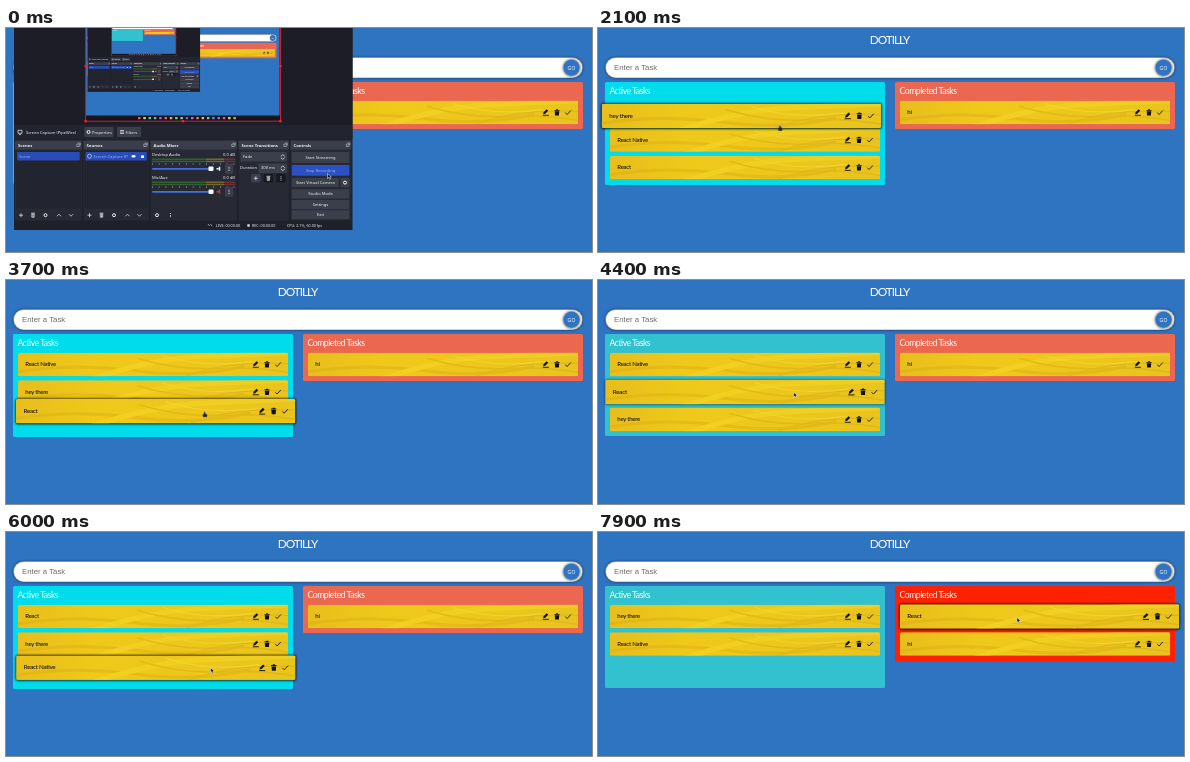
Write an HTML page that moves like this. It is 586 px wide and 224 px high and loops after 8000 ms.

```html
<!DOCTYPE html>
<html lang="en">
<head>
<meta charset="utf-8">
<title>Task board</title>
<style>
html, body { margin: 0; width: 100%; height: 100%; overflow: hidden; background: #2f74c0; }
svg { display: block; }
text { white-space: pre; }
.hand { font-family: Lato, sans-serif; }
.title { font-size: 11.8px; letter-spacing: -1px; fill: #fff; }
.head { font-size: 8.7px; letter-spacing: -.48px; fill: #fff; }
.task { font-size: 6.1px; letter-spacing: -.28px; fill: #000; }
.field { font: 7.8px "Liberation Sans", Arial, sans-serif; fill: #6c6c6c; }
.go { font: 5px "Liberation Sans", Arial, sans-serif; fill: #fff; }
.ui { font: 4.1px "Noto Sans", sans-serif; fill: #f0f1f4; }
.ui.bold { font-weight: 700; font-size: 4.2px; }
.ui.tiny { font-size: 3.7px; }
.ui.faint { fill: #9db4ee; }
</style>
</head>
<body>
<svg id="stage" width="586" height="224" viewBox="0 0 586 224">
  <defs>
    <filter id="soft" x="-20%" y="-50%" width="140%" height="200%"><feGaussianBlur stdDeviation="1.2"/></filter>
    <clipPath id="cardClip"><rect x="-135" y="-11.8" width="270" height="23.6" rx="1.5"/></clipPath>
    <clipPath id="previewClip"><rect x="80" width="194" height="93"/></clipPath>
    <linearGradient id="paint">
      <stop offset="0" stop-color="#e8be1c"/>
      <stop offset=".3" stop-color="#efc91a"/>
      <stop offset="1" stop-color="#e9c41d"/>
    </linearGradient>
    <g id="icons" fill="#111">
      <path d="M-35.2 2.8h6" stroke="#111" stroke-width=".9"/>
      <path d="M-34.8 1.7l.4-1.9 3-3 1.6 1.5-3 3z"/>
      <path d="M-23.6 -2.6h1.4l.4-.7h1.6l.4.7h1.4v.9h-5.2zM-23.2 -1.2h4.4l-.3 4.2h-3.8z"/>
      <path d="M-12.7 .2l1.8 1.8 3.7-4" fill="none" stroke="#111" stroke-width=".9"/>
    </g>
    <g id="paper" clip-path="url(#cardClip)">
      <rect x="-135" y="-11.8" width="270" height="23.6" fill="url(#paint)"/>
      <g fill="none" stroke-linecap="round" opacity=".45">
        <path d="M-140 8Q-80 -2 -20 6T90 2" stroke="#d9ae16" stroke-width="3"/>
        <path d="M-60 14Q0 -6 50 -8T140 -12" stroke="#f6d92c" stroke-width="5"/>
        <path d="M-15 -6Q25 6 65 4T140 9" stroke="#d6ab18" stroke-width="1.6"/>
        <path d="M10 -9Q50 4 100 -3" stroke="#f9e247" stroke-width="1.3"/>
        <path d="M30 13Q70 -4 138 -1" stroke="#cfa414"/>
      </g>
    </g>
  </defs>
</svg>
<script>
const LOOP = 8000, STEP = 100;
const stage = document.getElementById("stage");

function el(parent, tag, attrs = {}, content = "") {
  const node = document.createElementNS("http://www.w3.org/2000/svg", tag);
  for (const k in attrs) node.setAttribute(k, attrs[k]);
  if (content) node.textContent = content;
  return parent.appendChild(node);
}
const box = (p, x, y, width, height, fill, rx = 0) => el(p, "rect", { x, y, width, height, fill, rx });
const dot = (p, cx, cy, r, fill) => el(p, "circle", { cx, cy, r, fill });
const label = (p, x, y, s, cls, anchor = "start") => el(p, "text", { x, y, class: cls, "text-anchor": anchor }, s);
const line = (p, d, stroke = "#f0f1f4", width = .7) => el(p, "path", { d, stroke, "stroke-width": width, fill: "none" });
function blur(node, opacity) {
  node.setAttribute("filter", "url(#soft)");
  node.setAttribute("opacity", opacity);
  return node;
}
const home = (col, slot) => ({ x: 147 + 290 * col, y: 84.5 + 27.5 * slot });

function drawCard(p, text) {
  const node = el(p, "g");
  const shade = blur(box(node, -135.5, -12.3, 271, 25, "#000", 2), 0);
  el(node, "use", { href: "#paper" });
  label(node, -127.7, 1.6, text, "hand task");
  el(node, "use", { href: "#icons", x: 135 });
  return { node, shade };
}
function place(card, { x, y }, lift = 0, shade = 0) {
  card.node.setAttribute("transform", `translate(${x} ${y}) scale(${1 + lift * .035})`);
  card.shade.setAttribute("opacity", shade);
}

function drawPage(p) {
  box(p, 0, 0, 586, 280, "#2f74c0");
  label(p, 291.5, 15.9, "DOTILLY", "hand title", "middle");
  blur(box(p, 7, 29, 570, 21.5, "#000", 10.7), .4);
  box(p, 7.3, 29.3, 569.4, 20.7, "#a9a9a4", 10.3);
  box(p, 8, 30, 568, 19.4, "#fff", 9.7);
  label(p, 16, 42.4, "Enter a Task", "field");
  blur(dot(p, 565.5, 39.8, 9, "#000"), .5);
  dot(p, 565.5, 39.7, 8, "#2f74c0");
  label(p, 565.5, 41.5, "GO", "go", "middle");
  return ["Active Tasks", "Completed Tasks"].map((name, i) => {
    const column = box(p, 7 + 290 * i, 54, 280, i ? 47 : 102, i ? "#eb6750" : "#31c1cf", 1.5);
    label(p, 11.5 + 290 * i, 65.8, name, "hand head");
    return column;
  });
}

// Recorder window
const plus = (p, x, y) => line(p, `M${x - 2} ${y}h4M${x} ${y - 2}v4`);
const trash = (p, x, y) => line(p, `M${x - 2} ${y - 2}h4M${x - 1.2} ${y - 1}v3h2.400v-3zM${x} ${y - 1}v3`);
const gear = (p, x, y) => line(p, `M${x - 1.5} ${y}a1.500 1.500 0 1 0 3 0a1.500 1.500 0 1 0 -3 0`, "#f0f1f4", 1);
const chevron = (p, x, y, s) => line(p, `M${x - 2} ${y + s}l2 ${-2 * s}l2 ${2 * s}`);
const dots = (p, x, y) => [-1.6, 0, 1.6].forEach(d => dot(p, x, y + d, .5, "#f0f1f4"));
const key = (p, x, y, w, h) => box(p, x, y, w, h, "#3b3f4c", 1);

function drawPreview(p, depth) {
  const view = el(p, "g", { "clip-path": "url(#previewClip)" });
  const screen = el(view, "g", { transform: "translate(79 -3.2) scale(.332)" });
  drawPage(screen);
  place(drawCard(screen, "hi"), home(1, 0));
  if (depth) drawWindow(screen, depth - 1);
  box(view, 80, 87.5, 194, 5, "#14151c");
  for (let i = 0; i < 19; i++) box(view, 132 + i * 5.3, 89, 2.5, 2.2, `hsl(${i * 67} 60% 62%)`);
  line(p, "M79.7 0V93.2H274.5V0", "#e0222c", .9);
  for (const x of [79.7, 177, 274.5])
    for (const y of [38, 93.2]) if (x != 177 || y > 38) box(p, x - 1.2, y - 1.2, 2.4, 2.4, "#f0202c");
}

function drawMixer(p, y, name) {
  label(p, 146, y, name, "ui");
  label(p, 229, y, "0.0 dB", "ui", "end");
  for (const dy of [2.2, 4.4]) {
    box(p, 146, y + dy, 54, 1.5, "#32602f");
    box(p, 200, y + dy, 18, 1.5, "#706a31");
    box(p, 218, y + dy, 11, 1.5, "#713035");
  }
  for (let i = 0; i < 13; i++) box(p, 146 + i * 6.8, y + 7, .6, 1.5, "#b4b7c0");
  box(p, 146, y + 11.6, 60, 1.8, "#3f6fe0", .9);
  box(p, 202.5, y + 10.3, 5, 4.4, "#fff", 1);
  line(p, `M210.500 ${y + 12.5}h2M213.500 ${y + 10.5}v4`, name == "Mic/Aux" ? "#d0333c" : "#f0f1f4", 1.6);
  key(p, 219, y + 7.5, 8, 10);
  dots(p, 223, y + 12.5);
}

function drawWindow(p, depth) {
  const win = el(p, "g");
  box(win, 8, 0, 338.5, 202, "#1e202a");
  box(win, 8, 0, 338.5, 97, "#1d1d28");
  drawPreview(win, depth);
  box(win, 8, 97, 338.5, 14, "#22252f");
  line(win, "M12 102.3h4v3h-4zM13 106.6h2");
  label(win, 20, 105.6, "Screen Capture (PipeWire)", "ui");
  key(win, 78.5, 99, 29, 10);
  gear(win, 82.5, 104);
  label(win, 86, 105.6, "Properties", "ui");
  key(win, 111, 99, 24, 10);
  line(win, "M114 102.5h4M114 104h4M114 105.5h4");
  label(win, 119.5, 105.6, "Filters", "ui");

  const docks = { Scenes: 9, Sources: 77.5, "Audio Mixer": 144.5, "Scene Transitions": 232.5, Controls: 284.5 };
  const edges = [...Object.values(docks), 347];
  Object.keys(docks).forEach((name, i) => {
    const x = edges[i], w = edges[i + 1] - x - 1.7;
    box(win, x, 112.5, w, 80, "#272a35", 1);
    box(win, x, 112.5, w, 9, "#3a3e4b", 1);
    label(win, x + 3, 118.6, name, "ui bold");
    line(win, `M${x + w - 5} 116h2.500v2.500h-2.500zM${x + w - 4} 115h2.500v2.500`, "#d6d8de", .5);
    if (i > 1) return;
    box(win, x + 1, 122.5, w - 2, 58, "#22242f");
    box(win, x + 2, 124, w - 4, 8.5, "#284cb8", 1);
    plus(win, x + 6, 187.2);
    trash(win, x + 18, 187.2);
    gear(win, x + 30.5, 187.2);
    chevron(win, x + 44, 187.2, 1);
    chevron(win, x + 56, 187.2, -1);
  });
  label(win, 13, 129.7, "Scene", "ui faint");
  line(win, "M81.500 128.200a2 2 0 1 0 4 0a2 2 0 1 0 -4 0", "#c9d5f6");
  label(win, 87.5, 129.7, "Screen Capture (P", "ui faint");
  box(win, 125.5, 127, 4, 2.4, "#eef1fa", 1.2);
  box(win, 135, 127.4, 3, 2.6, "#eef1fa");
  gear(win, 151, 187.2);
  dots(win, 164.5, 187.2);

  drawMixer(win, 128.3, "Desktop Audio");
  drawMixer(win, 151.3, "Mic/Aux");

  key(win, 234.5, 124, 46.5, 9.5);
  label(win, 237, 130.2, "Fade", "ui");
  label(win, 234, 141.4, "Duration", "ui");
  key(win, 252.5, 135.5, 28.5, 9.5);
  label(win, 255, 141.4, "300 ms", "ui");
  for (const y of [129, 140.3]) { chevron(win, 276.8, y - 1.5, .8); chevron(win, 276.8, y + 1.5, -.8); }
  [plus, trash, dots].forEach((icon, i) => {
    box(win, 245 + i * 12.6, 146, 9.5, 8.5, i ? "#171922" : "#3b3f4c", 1);
    icon(win, 249.8 + i * 12.6, 150.3);
  });

  const buttons = ["Start Streaming", "Stop Recording", "Start Virtual Camera", "Studio Mode", "Settings", "Exit"];
  buttons.forEach((name, i) => {
    const y = 129.5 + 13.2 * i - .35 * i * i, w = i == 2 ? 47 : 57.5, h = i < 2 ? 10.8 : 9.2;
    box(win, 285.8, y - h / 2, w, h, i == 1 ? "#2a52c4" : "#3b3f4c", 1);
    label(win, 285.8 + w / 2, y + 1.5, name, i == 1 ? "ui faint" : "ui", "middle");
  });
  key(win, 334.5, 150, 9, 9.2);
  gear(win, 339, 154.6);

  line(win, "M202 196l1.500 2M204.500 196l1.500 2", "#c8cbd3");
  label(win, 210, 198.9, "LIVE: 00:00:00", "ui tiny");
  dot(win, 242.5, 197.5, 1.4, "#c8cbd3");
  label(win, 246, 198.9, "REC: 00:00:00", "ui tiny");
  label(win, 281, 198.9, "CPU: 2.1%, 60.00 fps", "ui tiny");
  return win;
}

const [active, done] = drawPage(stage);
const deck = el(stage, "g");
const cards = {};
for (const name of ["hi", "hey there", "React Native", "React"]) cards[name] = drawCard(deck, name);
const win = drawWindow(stage, 1);

const pointer = el(stage, "g");
const arrow = el(pointer, "path", {
  d: "M-1.5 -2.5v5l1.2-1.1.9 1.8.9-.5-.8-1.7h1.6z", fill: "#111", stroke: "#fff", "stroke-width": .5 });
const palm = el(pointer, "path", {
  d: "M-1.8 2.3L-2.3 0Q-1.8 -.8 -1 -.4V-2.3Q-.3 -3 .3 -2.3V-1Q2.2 -1 2.1 .5L1.7 2.3z",
  fill: "#20242e", stroke: "#5a6178", "stroke-width": .4 });

// Drags: column and slot at both ends, pick-up and drop times, grip on the card, wobble
const drags = [
  { who: "hey there", from: [0, 0], to: [0, 1], pick: 1900, drop: 3000, grip: { x: 38, y: 12.5 }, sway: -4, dip: 0 },
  { who: "React", from: [0, 2], to: [0, 1], pick: 3400, drop: 4320, grip: { x: 50, y: 3.5 }, sway: 3, dip: 15 },
  { who: "React Native", from: [0, 0], to: [0, 2], pick: 5300, drop: 6300, grip: { x: 57, y: 2.5 }, sway: -3, dip: 0 },
  { who: "React", from: [0, 0], to: [1, 0], pick: 7100, drop: 8000, grip: { x: 52.5, y: 3.5 }, sway: -7, dip: 0 }
];

const clamp = v => Math.min(1, Math.max(0, v));
const ease = v => { const k = clamp(v); return k * k * (3 - 2 * k); };
const mix = (a, b, k) => ({ x: a.x + (b.x - a.x) * k, y: a.y + (b.y - a.y) * k });
// The pointer trails its grip on long sideways pulls.
const hold = (c, grip) => ({ x: c.x + grip.x - (c.x - 147) / 4, y: c.y + grip.y });

function layout(lists) {
  const spots = {};
  lists.forEach((list, col) => list.forEach((name, slot) => spots[name] = home(col, slot)));
  return spots;
}

function dragSpot(d, p) {
  const spot = mix(home(...d.from), home(...d.to), ease(p * 1.2));
  spot.x += d.sway * Math.sin(2 * Math.PI * p);
  if (p < 1 / 3) spot.y += d.dip * Math.sin(3 * Math.PI * p);
  return spot;
}

function draw(t) {
  const lists = [["hey there", "React Native", "React"], ["hi"]];
  const lifts = {}, shades = {};
  let spots = layout(lists), rest = { x: 334, y: 112 }, free = 1100;
  let cursor = mix({ x: 323, y: 148 }, rest, ease(t / free));
  let hand = false, over = false, overDone = false;

  for (const d of drags) {
    const p = clamp((t - d.pick) / (d.drop - d.pick));
    const lift = clamp((t - d.pick + 250) / 150) * clamp((d.drop + 300 - t) / 200);
    if (t >= free) cursor = mix(rest, hold(home(...d.from), d.grip), ease((t - free) / (d.pick - 200 - free)));
    if (p > 0) {
      const before = spots;
      lists[d.from[0]].splice(d.from[1], 1);
      lists[d.to[0]].splice(d.to[1], 0, d.who);
      const after = layout(lists);
      spots = {};
      for (const name in after) spots[name] = mix(before[name], after[name], ease((p - .4) * 5));
      spots[d.who] = dragSpot(d, p);
      cursor = hold(spots[d.who], d.grip);
    }
    if (lift > 0) {
      const held = p > 0 && p < 1;
      lifts[d.who] = lift;
      shades[d.who] = lift * (held ? .85 : .4);
      hand = p < .5;
      overDone = held && spots[d.who].x > 292;
      over = held && !overDone;
      if (deck.lastChild !== cards[d.who].node) deck.appendChild(cards[d.who].node);
    }
    rest = hold(home(...d.to), d.grip);
    free = d.drop;
  }

  for (const name in cards) place(cards[name], spots[name], lifts[name], shades[name]);
  active.setAttribute("fill", over ? "#00dcec" : "#31c1cf");
  active.setAttribute("height", over ? 103 : 102);
  done.setAttribute("fill", overDone ? "#ff2100" : "#eb6750");
  done.setAttribute("height", overDone ? 75.5 : 47);
  win.setAttribute("opacity", 1 - clamp((t - 200) / 300));
  pointer.setAttribute("transform", `translate(${cursor.x} ${cursor.y})`);
  arrow.setAttribute("opacity", hand ? 0 : 1);
  palm.setAttribute("opacity", hand ? 1 : 0);
}

const start = performance.now();
function tick() {
  const t = (performance.now() - start) % LOOP;
  draw(Math.floor(t / STEP) * STEP);
  requestAnimationFrame(tick);
}
tick();
</script>
</body>
</html>
```
